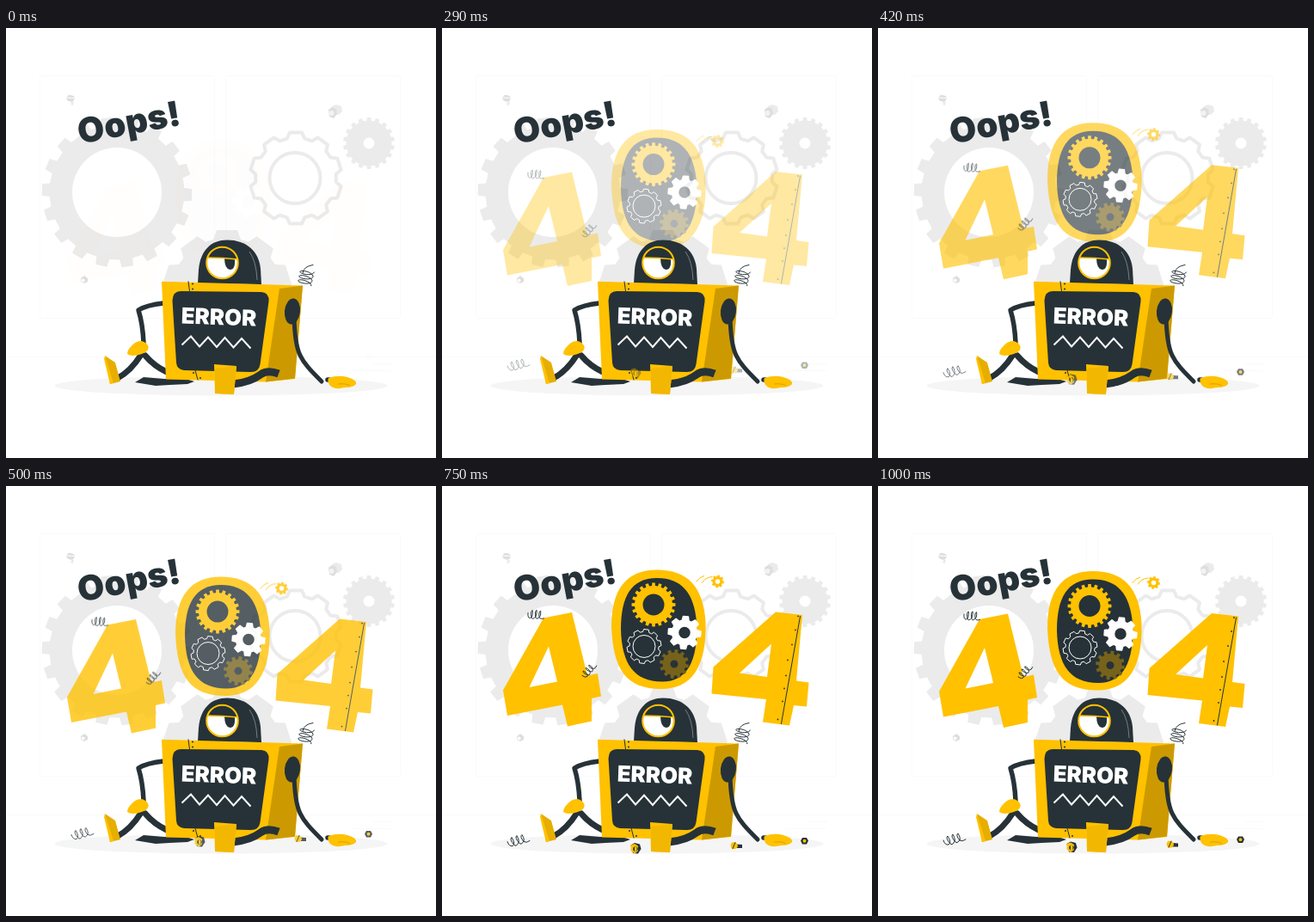
An HTML page for the animation above (1040 ms loop, 500 by 500 pixels).

```html
<!DOCTYPE html>
<html lang="en">
<head>
<meta charset="utf-8">
<title>Error robot</title>
<style>
  html, body { margin: 0; width: 100%; height: 100%; overflow: hidden; background: #fff; }
  svg { display: block; width: 100vw; height: 100vh; }
  text { font-family: Inter, "Open Sans", sans-serif; font-weight: 900; }
  .y { fill: #ffc100; } .d { fill: #263238; } .w { fill: #fff; } .g { fill: #ebebeb; }
  .line { fill: none; stroke: #263238; stroke-linecap: round; stroke-linejoin: round; }
  .thin { stroke-width: 1; }
  .limb { stroke-width: 5.5; }
  .curl { vector-effect: non-scaling-stroke; }
</style>
</head>
<body>
<svg viewBox="0 0 500 500">
  <defs>
    <path id="curl" class="curl" d="M0 0q2 6 6 5q4-2-1-10q-3 2 3 9q2 2 4-1q3-3-1-10q-3 2 3 9q2 2 4-1q3-3-1-9q-3 2 2 8q3 2 7-1"/>
  </defs>
  <g fill="none" stroke="#fafafa">
    <rect x="39.5" y="55.5" width="203" height="282" rx="2"/>
    <rect x="255.5" y="55.5" width="203" height="282" rx="2"/>
    <path d="M0 382.5H500M427 390.5H448M400 398.5H447"/>
  </g>
  <g id="backGears"></g>
  <g class="g">
    <g transform="rotate(15 75 82)"><rect x="70.5" y="78" width="9" height="7.5" rx="3.5" fill="#dedede"/><path d="M71 82L79 80.5" stroke="#fff"/><path d="M77 85h3v4h-3z"/></g>
    <path d="M379 91l5-2 6 2 1 6-4 4-6-1z"/>
    <path d="M375 95l4-3 5 2 1 6-4 5-5-2z" fill="#dedede"/><circle cx="378.5" cy="99" r="3" fill="#f2f2f2"/>
    <path d="M87 291l4-3 4 3v4l-4 2-4-2z" fill="#dedede"/><circle cx="89.5" cy="293.5" r="2" fill="#fff"/>
  </g>
  <ellipse cx="250" cy="416" rx="193.5" ry="11.5" fill="#f5f5f5"/>
  <path id="baseline" d="M86.500 135Q150 122 225 109" fill="none"/>
  <text class="d" font-size="40"><textPath href="#baseline">Oops!</textPath></text>

  <g class="rise">
    <path class="y" fill-rule="evenodd" d="M118 155L151 148.5 169 222 181 219.5 185 246 174 248.5 174 275 146 281 140 256 76 268.5 71 239ZM124 188L101.5 235.5 134 229Z"/>
    <path class="y" fill-rule="evenodd" d="M388 148L419 151.5 412 228 426.5 230 424 258 409 256.5 404 280 373 276 377 249.5 313.5 243 315.5 212ZM383 185L346 219 378 223.5Z"/>
    <path class="line thin" d="M416.5 153L394.5 278"/>
    <g id="rivets" class="d"></g>
    <path class="y" d="M250 99C285 99 304 118 306.500 160C308 212 290 237.500 255 237.500C214 237.500 199 215 197 165C197 122 214 99 250 99Z"/>
    <path class="d" d="M250 108.500C278 108.500 293 125 296 160C298 205 285 229 256 229C223 229 209 208 208 168C208 130 220 108.500 250 108.500Z"/>
    <g id="zeroGears"></g>
  </g>

  <g id="robot">
    <path class="d" d="M150 412L160 406 184 408 206 407 219 411 211 414 190 415 174 416 162 414Z"/>
    <path class="line limb" d="M183 320Q164 322 154 328Q159 344 160 366"/>
    <path class="line" stroke-width="7" d="M130 407Q145 399 157 380"/>
    <path class="line" stroke-width="7" d="M162 381Q172 393 187 400"/>
    <path d="M115 381L127 389 133 411 121 414Z" fill="#e6ae00"/>
    <path class="y" d="M115 381L114 385 121 414 125 413Z"/>
    <path class="y" d="M150 366Q159 361 165 369Q168 375 158 379Q146 383 141 379Q141 373 150 366Z"/>
    <path class="d" d="M223 297L224 281C226 258 239 246.5 257 246.5C280 246.5 294 260 296 280L297 298Z"/>
    <circle class="w" cx="251.5" cy="273" r="18"/>
    <path class="d" d="M233.5 267Q252 267 269.5 269A18 18 0 0 0 233.5 267Z"/>
    <path class="d" d="M254 267L266 268Q267 281 260.5 281Q254 280 254 267Z"/>
    <circle cx="251.5" cy="273" r="18.3" fill="none" stroke="#ffc100" stroke-width="2"/>
    <path d="M234 267Q252 267 270 269" fill="none" stroke="#ffc100" stroke-width="1.5"/>
    <path d="M283 260Q291 271 292 293" fill="none" stroke="#8b9296" stroke-width=".8"/>
    <path class="y" d="M181 294.800L345 299.500 336 408 302 411.500 186 408.500Z"/>
    <path d="M318 303L345 299.500 336 407.500 302 411.500Z" fill="#cc9a00"/>
    <path class="d" d="M203 306L297 307Q306.500 308 305.500 318L295.500 391Q294 400.500 284 400L207 398Q198.500 397 198 389L193.500 317Q194 306 203 306Z"/>
    <path class="line thin" d="M212 294.800L213.500 306M220 398L223 409"/>
    <g class="d"><circle cx="217" cy="297.5" r="1"/><circle cx="217" cy="303.5" r="1"/><circle cx="218" cy="401" r="1"/><circle cx="226" cy="407" r="1"/></g>
    <text class="w" font-size="25.8" transform="translate(203.500 343.500) rotate(2)">ERROR</text>
    <path d="M204.5 368.500L215 358.500 225 370.500 235 359.500 245 371 254.500 360 264.500 371.500 274 361 284.500 372.500" fill="none" stroke="#fff" stroke-width="2"/>
    <path class="line" stroke-width="9" style="stroke-linecap:butt" d="M264 414Q284 412 296 403Q304 397 317 402"/>
    <path class="y" d="M242 391L268 393 265 426 243 425Z"/>
    <path d="M243 396L268 393 265 426 243 425Z" fill="#f2b700"/>
    <ellipse class="d" cx="333" cy="329.5" rx="9" ry="15" transform="rotate(6 333 329)"/>
    <path class="line" stroke-width="5" d="M335 336C336 380 342 386 367 411"/>
    <path class="line limb" d="M374 409L376 409"/>
    <path class="y" d="M375 407Q386 403 397 406Q408 409 407 414Q404 418 394 418Q382 421 377 416Q373 411 375 407Z"/>
    <path d="M386 414Q396 413 400 416" fill="none" stroke="#cc9a00" stroke-width=".8"/>
    <path id="bodySpring" class="line thin"/>
  </g>

  <g class="rise">
    <g class="line thin">
      <use href="#curl" transform="translate(100 149) rotate(22) scale(.75 .95)"/>
      <use href="#curl" transform="translate(163 222) rotate(-32) scale(.78)"/>
    </g>
    <path d="M295.5 113Q300 107 305 106M302 114.5Q306 107.5 314.500 107" fill="none" stroke="#ffc100"/>
    <g id="smallNut"></g>
  </g>

  <g class="drop">
    <use href="#curl" class="line thin" transform="translate(76 412)"/>
    <path class="d" d="M219.5 416L224 413.5 230 415 231.5 420.5 228 426 222 425.5Z"/>
    <path class="y" d="M219.5 416L224 414.5 228 417 228 423 224 426 219.5 422.5Z"/>
    <circle class="d" cx="225" cy="420.5" r="2.8"/><path class="y" d="M224 418h2.5v5h-2.5z"/>
    <path class="d" d="M342 415L349 415.500V419.500L342 419.500Z"/>
    <path class="y" d="M337 413Q343 412 344 417Q343 421.500 337.500 420.500Q334 417 337 413Z"/>
    <path class="line thin" d="M338 420L341 413"/>
    <path class="d" d="M417 411L419 407.5 424 407.5 426 411 424 415 419 415Z"/>
    <circle cx="421.5" cy="411.200" r="1.9" fill="#ffc100"/>
  </g>
</svg>
<script>
const byId = id => document.getElementById(id);
const TAU = Math.PI * 2;

// Toothed ring; `tip` and `root` are the shares of one pitch taken by tooth top and base.
function gear(cx, cy, outer, inner, teeth, hole, phase = 0, tip = .44, root = .56) {
  const pitch = TAU / teeth, points = [];
  for (let i = 0; i < teeth; i++) {
    const mid = (i + phase) * pitch - TAU / 4;
    for (const [r, a] of [[inner, -root], [outer, -tip], [outer, tip], [inner, root]]) {
      const angle = mid + a * pitch / 2;
      points.push(`${(cx + r * Math.cos(angle)).toFixed(2)} ${(cy + r * Math.sin(angle)).toFixed(2)}`);
    }
  }
  return `M${points.join("L")}Z` + (hole ? ring(cx, cy, hole) : "");
}

const ring = (cx, cy, r) => `M${cx - r} ${cy}a${r} ${r} 0 1 0 ${2 * r} 0a${r} ${r} 0 1 0 ${-2 * r} 0Z`;

const shape = (d, attrs) => `<path d="${d}" fill-rule="evenodd" stroke-linejoin="round" ${attrs}/>`;

// Looping wire that advances along `angle` degrees.
function coil(x, y, angle, length, loops, across, along) {
  const a = angle * TAU / 360, steps = loops * 20, points = [];
  for (let i = 0; i <= steps; i++) {
    const u = i / steps, turn = u * loops * TAU;
    const p = length * u + along * Math.sin(turn), q = across * Math.cos(turn);
    points.push(`${(x + p * Math.cos(a) - q * Math.sin(a)).toFixed(1)} ${(y + p * Math.sin(a) + q * Math.cos(a)).toFixed(1)}`);
  }
  return "M" + points.join("L");
}

const gray = 'fill="#ebebeb"', outline = 'fill="none" stroke="#ebebeb" stroke-width="4"';
byId("backGears").innerHTML =
  shape(gear(129, 191, 87.5, 78.5, 18, 52, .6), gray) +
  shape(gear(257, 310, 76, 66, 10, 0, 0, .5, .78), gray) +
  shape(gear(337, 174.5, 53.5, 47, 10, 0, 0, .42, .7), outline) +
  shape(ring(336, 174.5, 29.5), outline) +
  shape(gear(422, 134, 30, 26.5, 18, 6.5), gray);

byId("zeroGears").innerHTML =
  shape(gear(246, 139.5, 25.5, 22, 20, 12.5), 'class="y"') +
  shape(gear(282, 172, 19, 14.5, 8, 7.5, .1, .4, .7), 'fill="#fff" stroke="#fff" stroke-width="1.5"') +
  shape(gear(235, 188, 20, 17, 10, 0, .2, .45, .7) + ring(235, 188, 13), 'fill="none" stroke="#fff"') +
  shape(gear(270, 208.5, 17, 13.5, 12, 4.5, .3), 'fill="#76621a"');

byId("smallNut").innerHTML = shape(gear(320.5, 112.5, 7.5, 6, 8, 2.8, .2), 'class="y"');

byId("rivets").innerHTML = [[414, 153], [411, 169], [407, 186], [402, 204], [400, 222], [398, 237], [396, 252], [390.5, 273]]
  .map(([x, y]) => `<circle cx="${x}" cy="${y}" r=".9"/>`).join("");

byId("bodySpring").setAttribute("d", coil(347, 298, -78, 16, 3, 8, 3) + "M345 285Q346 277 357 275.5");

// Cubic ease with a slight overshoot, solved for its parameter by bisection.
const cubic = (s, a, b) => 3 * (1 - s) ** 2 * s * a + 3 * (1 - s) * s * s * b + s ** 3;
function ease(x) {
  if (x <= 0 || x >= 1) return x <= 0 ? 0 : 1;
  let low = 0, high = 1;
  for (let i = 0; i < 30; i++) {
    const mid = (low + high) / 2;
    if (cubic(mid, .36, .5) < x) low = mid; else high = mid;
  }
  return cubic(low, -.01, 1.38);
}

const LOOP = 1040, FPS = 24, STEPS = 25, TRAVEL = 30;
const rising = document.querySelectorAll(".rise");
const dropping = document.querySelectorAll(".drop");

function place(elements, offset, opacity) {
  for (const el of elements) {
    el.setAttribute("transform", `translate(0 ${offset.toFixed(2)})`);
    el.setAttribute("opacity", opacity.toFixed(3));
  }
}

function update(time) {
  const step = Math.min(STEPS, Math.floor((time % LOOP) * FPS / 1000 + .1) + 1);
  const progress = ease(step / STEPS);
  const offset = TRAVEL * (1 - progress);
  const opacity = Math.max(0, Math.min(1, progress));
  place(rising, offset, opacity);
  place(dropping, -offset, opacity);
}

const start = performance.now();
function tick() {
  update(performance.now() - start);
  requestAnimationFrame(tick);
}
tick();
</script>
</body>
</html>
```
